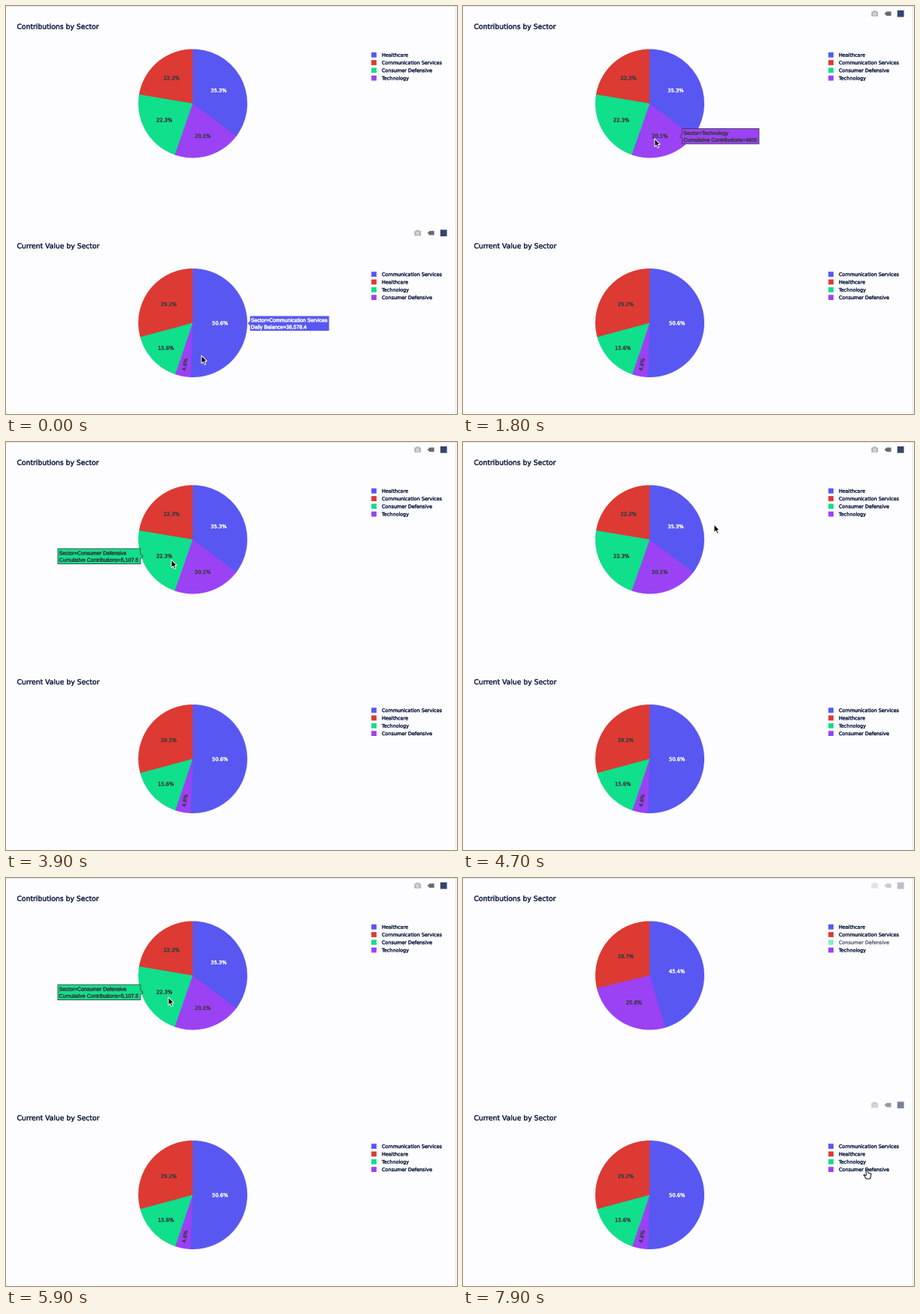
Recreate the animation shown at these times as a matplotlib script. Size 600 by 544 pixels, loop 8 s.

```python
import numpy as np
import matplotlib.pyplot as plt
from matplotlib.animation import FuncAnimation
from matplotlib.patches import Circle, Polygon, Rectangle, Wedge
from matplotlib.patheffects import withStroke

W, H, DPI = 600, 544, 100
FRAMES, STEP = 80, 100
CX, CY, RADIUS = 248.5, 130, 72.5
LOWER = 292.5          # offset of the second chart
SPLIT = 272            # border between the charts
HIDE_AT = 7.5          # the legend click removes one sector
BACK, INK, DARK = "#fdfcfe", "#1a284b", "#3a3a3e"
BLUE, RED, GREEN, PURPLE = "#5857f2", "#dc3a33", "#10df8b", "#9b42f5"

fig = plt.figure(figsize=(W / DPI, H / DPI), dpi=DPI, facecolor=BACK)
ax = fig.add_axes([0, 0, 1, 1])
ax.set(xlim=(0, W), ylim=(H, 0))
ax.axis("off")


def label(x, y, s, px, color=INK, font="DejaVu Sans", **kw):
    return ax.text(x, y, s, fontsize=px * 72 / DPI, color=color, fontfamily=font,
                   path_effects=[withStroke(linewidth=0.22)], **kw)


def rect(x, y, w, h, color):
    return ax.add_patch(Rectangle((x, y), w, h, fc=color, lw=0, snap=False))


def disc(x, y, r, color):
    return ax.add_patch(Circle((x, y), r, fc=color, lw=0))


def shape(points, **kw):
    return ax.add_patch(Polygon(points, snap=False, **kw))


def number(v):
    return f"{v:g}" if v < 10000 and v == int(v) else f"{v:,g}"


class Slice:
    """One sector between two clockwise angles measured from the top."""

    def __init__(self, cy, start, end, row, total, unit):
        name, value, self.color = row
        self.start, self.end = start, end
        self.ink = "white" if self.color == BLUE else DARK
        self.info = f"Sector={name}", f"{unit}={number(value)}"

        # text and hover label sit on the circle inscribed in the sector
        mid = np.radians((start + end) / 2)
        half = np.radians(min((end - start) / 2, 90))
        inner = RADIUS / (1 + 1 / np.sin(half))
        ux, uy = np.sin(mid), -np.cos(mid)
        self.side = 1 if ux > 0 else -1
        reach = RADIUS - inner
        self.tip = CX + ux * reach + self.side * inner, cy + uy * reach

        narrow = end - start < 25
        if narrow:
            reach = 0.78 * RADIUS
        note = label(CX + ux * reach, cy + uy * reach, f"{value / total:.1%}", 6.7,
                     self.ink, ha="center", va="center",
                     rotation=270 - np.degrees(mid) if narrow else 0)
        # reach a little under the next sector so that no seam shows
        wedge = Wedge((CX, cy), RADIUS, max(start - 1, 0) - 90, end - 90,
                      fc=self.color, lw=0)
        if narrow:
            note.set_rotation(270 - np.degrees(mid) if ux > 0
                              else 90 + 180 - np.degrees(mid))
        self.artists = [ax.add_patch(wedge), note]


class Pie:
    def __init__(self, cy, rows, unit):
        self.cy, self.slices = cy, []
        self.base = disc(CX, cy, RADIUS - 1, rows[0][2])
        total, end = sum(r[1] for r in rows), 360
        for row in rows[1:] + rows[:1]:
            start = end - 360 * row[1] / total
            self.slices.append(Slice(cy, start, end, row, total, unit))
            end = start

    def show(self, on):
        for a in [self.base] + [a for s in self.slices for a in s.artists]:
            a.set_visible(on)

    def hit(self, x, y):
        dx, dy = x - CX, y - self.cy
        if np.hypot(dx, dy) > RADIUS:
            return None
        angle = np.degrees(np.arctan2(dx, -dy)) % 360
        return next((s for s in self.slices if s.start <= angle <= s.end), None)


def legend(top, rows):
    items = []
    for i, (name, _, color) in enumerate(rows):
        y = top + 65.2 + 10.3 * i
        items.append((rect(486.1, y - 3.4, 6.8, 6.8, color),
                      label(500, y + 2.4, name, 6.44)))
    return items


def toolbar(top):
    y, grey = top + 10.2, "#b4b4b8"
    return [
        rect(543.3, y - 2.8, 8.8, 6.4, grey),
        rect(545.6, y - 4, 4.2, 1.6, grey),
        disc(547.7, y + 0.4, 2, BACK),
        disc(547.7, y + 0.4, 1.2, grey),
        shape([(560.6, y), (563.6, y - 2.8), (569.6, y - 2.8),
               (569.6, y + 2.8), (563.6, y + 2.8)], fc="#69696e", lw=0),
        rect(577.8, y - 4.4, 8.8, 8.8, "#33456b"),
    ]


contributions = [("Healthcare", 8083, BLUE),
                 ("Communication Services", 5115, RED),
                 ("Consumer Defensive", 5107.5, GREEN),
                 ("Technology", 4600, PURPLE)]
balances = [("Communication Services", 38578.4, BLUE),
            ("Healthcare", 22264.1, RED),
            ("Technology", 11893.6, GREEN),
            ("Consumer Defensive", 3507.2, PURPLE)]

rect(0, 0, W, 1, "#e6e5e8")
rect(598, 0, 1, H, "#e3e2e6")
label(14.5, 30.6, "Contributions by Sector", 9.23)
label(14.5, LOWER + 30.6, "Current Value by Sector", 9.23)

unit = "Cumulative Contributions"
full_pie = Pie(CY, contributions, unit)
cut_pie = Pie(CY, [r for r in contributions if r[2] != GREEN], unit)
value_pie = Pie(CY + LOWER, balances, "Daily Balance")
toggled = legend(0, contributions)[2]
legend(LOWER, balances)
bars = toolbar(0), toolbar(LOWER)

bubble = shape([(0, 0)] * 3, lw=0.6, zorder=4)
lines = [label(0, 0, "", 7, font="Liberation Sans", zorder=5) for _ in range(2)]

# pointers, relative to their hot spot
ARROW = np.array([(0, 0), (0, 10.6), (2.4, 8.4), (4.1, 12.2), (5.9, 11.4),
                  (4.3, 7.7), (7.4, 7.5)])
HAND = np.array([(-1.2, 0), (1.2, 0), (1.2, 4), (5.6, 5.4), (4.4, 12),
                 (-1.2, 12), (-4.6, 6.4), (-1.2, 7.6)])
pointer = shape(ARROW, lw=0.7, zorder=6)

# where the pointer rests: arrival and departure in seconds, x, y
STOPS = [(0, 0, 260, 466), (0.5, 0.6, 223, 402), (1.4, 2.7, 255, 177),
         (3.5, 3.9, 220, 157), (4.3, 4.4, 232, 97), (4.7, 5.5, 334, 110),
         (5.9, 6.4, 216, 159), (7.1, 7.1, 495, 103), (7.3, 7.5, 531, 87),
         (7.9, 8, 537.5, 389)]


def cursor(t):
    for (_, leave, *a), (arrive, _, *b) in zip(STOPS, STOPS[1:]):
        if t < arrive:
            u = np.clip((t - leave) / (arrive - leave), 0, 1)
            return np.array(a) + np.subtract(b, a) * u * u * (3 - 2 * u)
    return np.array(b)


def place_bubble(s):
    for a in (bubble, *lines):
        a.set_visible(s is not None)
    if s is None:
        return
    for line, text in zip(lines, s.info):
        line.set(text=text, color=s.ink)
    x, y = s.tip
    width = max(line.get_window_extent().width for line in lines) + 3.2
    notch, half = 3.2, 10.2
    near, far = x + s.side * notch, x + s.side * (notch + width)
    bubble.set_xy([(x, y), (near, y + notch), (near, y + half), (far, y + half),
                   (far, y - half), (near, y - half), (near, y - notch)])
    bubble.set(facecolor=s.color, edgecolor=s.ink)
    for line, dy in zip(lines, (-1.9, 7.2)):
        line.set_position((min(near, far) + 1.6, y + dy))


def draw(i):
    t = i * STEP / 1000
    x, y = cursor(t)
    hidden = t >= HIDE_AT
    full_pie.show(not hidden)
    cut_pie.show(hidden)
    for a in toggled:
        a.set_alpha(0.5 if hidden else 1)

    top_pie = cut_pie if hidden else full_pie
    place_bubble(top_pie.hit(x, y) or value_pie.hit(x, y))

    # toolbars cross-fade over three steps
    upper = np.mean([cursor(t - k * STEP / 1000)[1] < SPLIT for k in range(3)])
    for bar, alpha in zip(bars, (upper, 1 - upper)):
        for a in bar:
            a.set_alpha(alpha)

    row = y - LOWER * (y > SPLIT)
    on_legend = 483 < x < 583 and 60 < row < 101
    fill, edge = ("white", "black") if on_legend else ("black", "white")
    pointer.set_xy((HAND if on_legend else ARROW) + (x, y))
    pointer.set(facecolor=fill, edgecolor=edge)
    return []


anim = FuncAnimation(fig, draw, frames=FRAMES, interval=STEP, repeat=True,
                     repeat_delay=0, init_func=lambda: [], blit=False)
plt.show()
```
